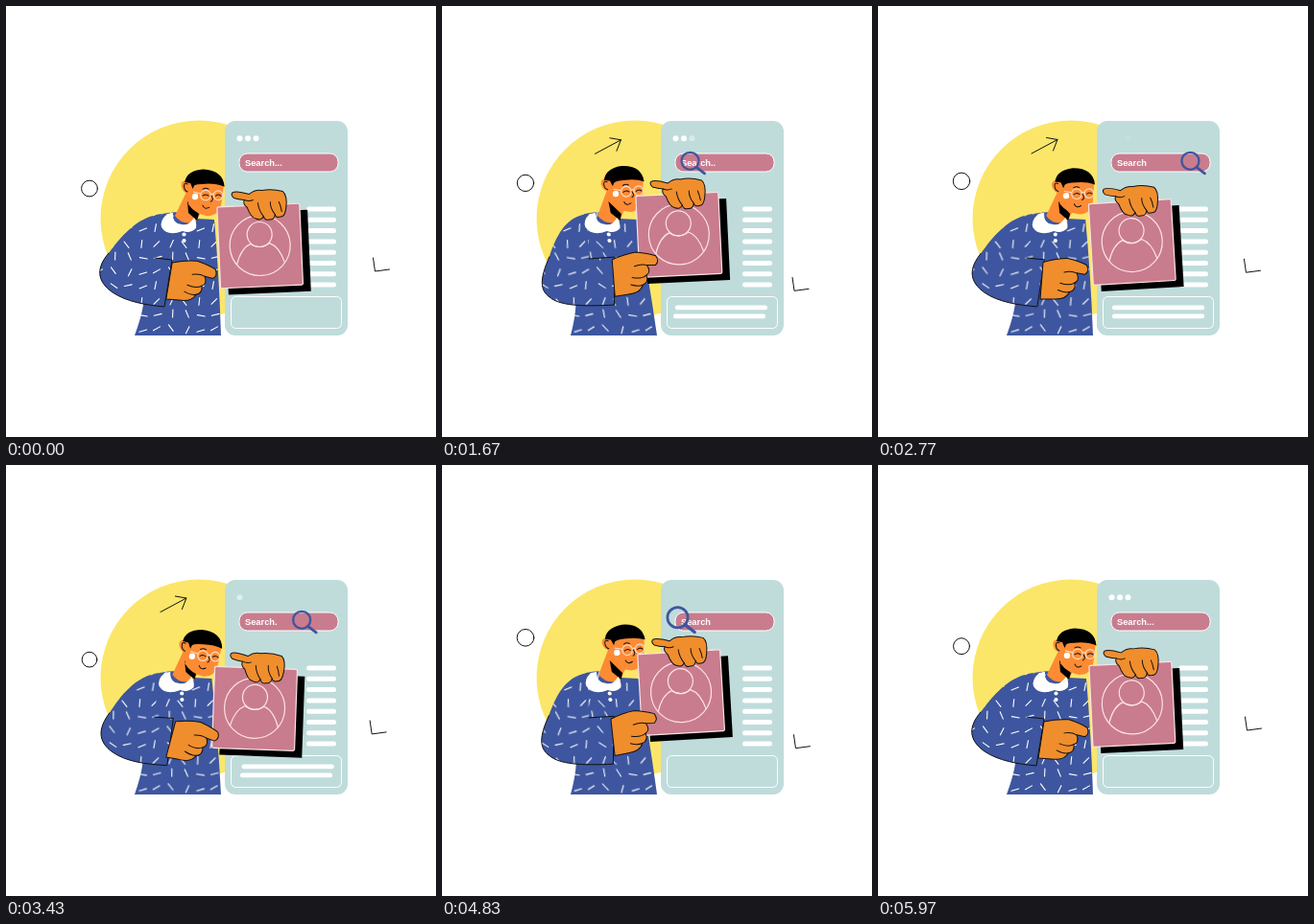
An HTML page that plays this animation: 448x450 px, repeating every 6010 ms.

```html
<!DOCTYPE html>
<html lang="en">
<head>
<meta charset="utf-8">
<title>Profile search</title>
<style>
html, body { margin: 0; width: 100%; height: 100%; overflow: hidden; background: #fff; }
svg { display: block; }
.ink { fill: none; stroke: #111; stroke-width: 1; stroke-linecap: round; stroke-linejoin: round; }
.skin { fill: #fd8b34; }
.palm { fill: #f08e2d; }
.white { fill: #fff; }
.thin { fill: none; stroke: #fbe3e4; stroke-width: 1.2; stroke-linecap: round; }
.glass { fill: none; stroke: #fcd9c0; stroke-width: 1.2; }
text { font: bold 9.3px "Liberation Sans", Arial, sans-serif; fill: #fff; }
</style>
</head>
<body>
<svg width="448" height="450" viewBox="0 0 448 450">
  <defs>
    <pattern id="knit" width="60" height="60" patternUnits="userSpaceOnUse">
      <rect width="60" height="60" fill="#3d569f"/>
      <path id="dashes" stroke="#fff" stroke-width="1.1" stroke-linecap="round"/>
    </pattern>
    <clipPath id="boxClip"><rect x="234.5" y="303.5" width="115" height="33" rx="5"/></clipPath>
  </defs>

  <circle cx="201" cy="222" r="102.5" fill="#fbe669"/>
  <path id="arrow" class="ink" d="M160 154L187 139.500M175.500 137.500L187 139.500L182.500 151"/>
  <circle id="ring" class="ink" cx="87"/>
  <path id="corner" class="ink" stroke-width=".9" d="M-2-14L0 0L15-2"/>

  <!-- search panel -->
  <rect x="228" y="120" width="128" height="224" rx="11" fill="#bfdcdb"/>
  <g id="topDots" class="white"></g>
  <rect x="243" y="154" width="103" height="19" rx="8.500" fill="#c97c8d" stroke="#fff"/>
  <text id="label" x="249" y="167"></text>
  <path id="list" stroke="#fff" stroke-width="5" stroke-linecap="round"/>
  <rect x="234.500" y="303.500" width="115" height="33" rx="5" fill="none" stroke="#fff"/>
  <g clip-path="url(#boxClip)" class="white">
    <rect id="row1" y="312.500" width="96" height="4.800" rx="2"/>
    <rect id="row2" y="321.500" width="96" height="4.800" rx="2"/>
  </g>
  <g id="lens" fill="none" stroke="#3d569f" stroke-linecap="round">
    <circle cx="-16.500" cy="-14.500" r="9" stroke-width="2.300"/>
    <path d="M-10-8L-1.500-1.500" stroke-width="2.800"/>
  </g>

  <!-- person -->
  <g id="torso">
    <path fill="url(#knit)" d="M163 217Q185 212 198 222L217 223Q222 280 224 344H134Q141 325 143 312L130 250Z"/>
    <path class="skin" d="M189 192L176 219Q184 230 198 225L205 212Z"/>
    <path d="M189 204L190 216L199 224L201 217Z"/>
  </g>
  <g id="head">
    <path class="skin" d="M190 182L227 184L224.500 206Q222 219 210 219Q197 217 190 207Z"/>
    <path class="skin" d="M193 184Q182 180 182.500 188Q184 196 193 197Z"/>
    <path class="ink" d="M189 186Q185 184 185.500 189Q186 193 189 194"/>
    <path d="M186 184Q188 172 205 170.500Q226 171 227.500 188.500Q219 185 208 185.500Q198 185.500 196 187.500L194.500 191L192 185Z"/>
    <circle class="white" cx="197" cy="199" r="3.200"/>
    <g class="glass">
      <circle cx="208" cy="197.500" r="5.300"/><circle cx="221" cy="197.500" r="4.800"/>
      <path d="M213 197Q215 195 216.500 197M203 196L195 194"/>
    </g>
    <path class="ink" d="M205 198Q208 195.500 211 198M218.500 198Q221 195.500 224 198M205 191Q208 189 211 191M214 198Q217 202 213.500 204M205 208Q207 213 212 210"/>
  </g>

  <!-- card and upper hand -->
  <g id="card">
    <rect x="-35" y="-35" width="86" height="85"/>
    <rect x="-43" y="-42" width="86" height="85" rx="1.500" fill="#c97c8d" stroke="#fbe3e4" stroke-width="1.200"/>
    <g class="thin">
      <circle r="31.500"/><circle cy="-11.500" r="13"/>
      <path d="M-25 19Q-20 2-10-2Q0 5 10-2Q20 2 25 19"/>
    </g>
    <g transform="rotate(2.700) translate(-264.500 -250.500)">
      <path class="ink palm" style="fill:#f08e2d" d="M235.500 195.500Q239 193 253 197Q259 192 266 193Q277 191 288 194Q293 198 291.500 211Q290.500 221 285.500 220.500Q281 222 280 218Q279.500 224 274 223.500Q269.500 225 268 220Q266 225 260 222.500Q255 222 251 211Q246 207 248 203Q242 202.500 237 201Q233.500 198 235.500 195.500Z"/>
      <path class="ink" d="M268 220Q263 214 262 206M280 218Q275 212 275 205M287 215Q286 209 284 205M248 203Q253 205 257 203"/>
    </g>
  </g>

  <!-- near arm and collar -->
  <path id="sleeve" fill="url(#knit)"/>
  <path id="cuff" class="ink"/>
  <g id="collar" class="white">
    <path d="M168 217Q160 224 162 231Q168 241 184 235Q192 238 198 232Q199 226 196 221Q190 230 183 228Q173 227 174 216Z"/>
    <circle cx="185.500" cy="238.500" r="2.100"/>
    <circle cx="185.500" cy="245" r="2.100"/>
  </g>
  <g id="hand">
    <path class="ink" style="fill:#f08e2d" d="M173 268Q187 265 199 266Q211 270 218 274.500Q221 281 215.500 284L207 282Q210 290 204 292Q205 300 198 301Q194 309 180 307L167 306Z"/>
    <path class="ink" d="M207 282Q202 279 194 280M204 292Q198 295 189 291M198 301Q193 302 186 298"/>
  </g>
</svg>
<script>
const LOOP = 6010, SWAY = LOOP / 2, BLINK = LOOP / 3;
const el = id => document.getElementById(id);
const set = (id, name, value) => el(id).setAttribute(name, value);
const move = (id, value) => set(id, "transform", value);
const clamp = x => Math.max(0, Math.min(1, x));
const ramp = (t, start, length) => clamp((t - start) / length);
const ease = (t, start, length) => (1 - Math.cos(Math.PI * ramp(t, start, length))) / 2;

// sleeve points, leaning right and leaning left
const armRight = [162,217, 136,220, 119,242, 107,258, 94,273, 94,287, 111,299, 126,309, 145,312, 165,314, 173,265, 155,263];
const armLeft = [150,217, 128,221, 119,240, 112,262, 102,285, 102,297, 112,304, 122,313, 145,314, 180,312, 180,262, 153,264];

let seed = 7;
const rand = () => (seed = seed * 16807 % 2147483647) / 2147483647;
let dashes = "";
for (let i = 0; i < 16; i++) {
  const x = i % 4 * 15 + 5.5 + rand() * 4, y = (i >> 2) * 15 + 5.5 + rand() * 4;
  const a = rand() * Math.PI, dx = 4 * Math.cos(a), dy = 4 * Math.sin(a);
  dashes += `M${x - dx} ${y - dy}L${x + dx} ${y + dy}`;
}
set("dashes", "d", dashes);
set("list", "d", Array.from({length: 8}, (_, i) => `M315.500 ${212 + i * 11.3}H341.500`).join(""));
el("topDots").innerHTML = [0, 1, 2].map(i => `<circle cx="${243.5 + i * 8.5}" cy="138.200" r="3"/>`).join("");

function drawPerson(t) {
  const phase = 2 * Math.PI * t / SWAY;
  const wave = (peak, n = 1) => Math.cos(n * (phase - peak * Math.PI / 180));
  const s = (1 + wave(0)) / 2, lean = 1 - s;
  const skew = 0.115 * lean;
  const bend = `matrix(1 0 ${skew} 1 ${-344 * skew} 0)`;

  move("torso", bend);
  move("collar", bend);
  set("knit", "patternTransform", bend);
  move("head", `translate(${-16.5 * lean} ${2 * wave(52) - 1.2}) rotate(${6 * wave(75) - 1} 197 199)`);
  move("card", `translate(${255 + 10 * wave(-15)} ${245.3 + 8.6 * wave(57)}) rotate(${4 * wave(98) + 1.4 * wave(98, 2) - 0.6})`);

  const p = armRight.map((v, i) => v * s + armLeft[i] * lean);
  const pts = (from, to) => p.slice(from * 2, to * 2).join(" ");
  set("sleeve", "d", `M${pts(0, 1)}C${pts(1, 10)}L${pts(10, 12)}Z`);
  set("cuff", "d", `M${pts(3, 4)}C${pts(4, 10)}L${pts(10, 12)}`);
  move("hand", `translate(${9 * lean} ${-3 * lean}) rotate(${11 * wave(60) - 5} 170 287)`);

  set("ring", "cy", 190.5 + 16.3 * Math.sin(phase));
  set("ring", "r", 8.4 - 0.7 * Math.sin(phase));
  move("corner", `translate(${366.5 + 18 * s} ${298 - 21 * s})`);
}

function drawPanel(t) {
  const p = t % BLINK;
  const count = p < 500 ? 3 : p < 1250 ? 0 : p < 1500 ? 1 : p < 1750 ? 2 : 3;
  el("label").textContent = "Search" + ".".repeat(count);
  [...el("topDots").children].forEach((dot, i) =>
    dot.setAttribute("opacity", 1 - ramp(p, 450 + 100 * i, 130) + ramp(p, 1330 + 130 * i, 200)));

  const enter = ease(t, 435, 1320), leave = ease(t, 3325, 1320);
  set("row1", "x", 138 + 106 * (enter + leave));
  set("row2", "x", 138 + 106 * (ease(t, 690, 1100) + ease(t, 3620, 1100)));

  const shift = 57 * (enter - 1 + leave);
  move("arrow", `translate(${shift} ${-0.55 * shift})`);
  set("arrow", "opacity", clamp(1.7 * Math.min(enter, 1 - leave)));

  const x = 265 + 77 * (ease(t, 1323, 1477) - ease(t, 2966, 1477));
  const grow = 1.18 * ease(t, 500, 200) - 0.18 * ease(t, 700, 150);
  const shrink = 0.18 * ease(t, 4640, 180) - 1.18 * ease(t, 4840, 200);
  move("lens", `translate(${x} 176.300) scale(${Math.max(0, grow + shrink)})`);
}

const start = performance.now();
function frame() {
  const t = (performance.now() - start) % LOOP;
  drawPerson(t);
  drawPanel(t);
  requestAnimationFrame(frame);
}
frame();
</script>
</body>
</html>
```
